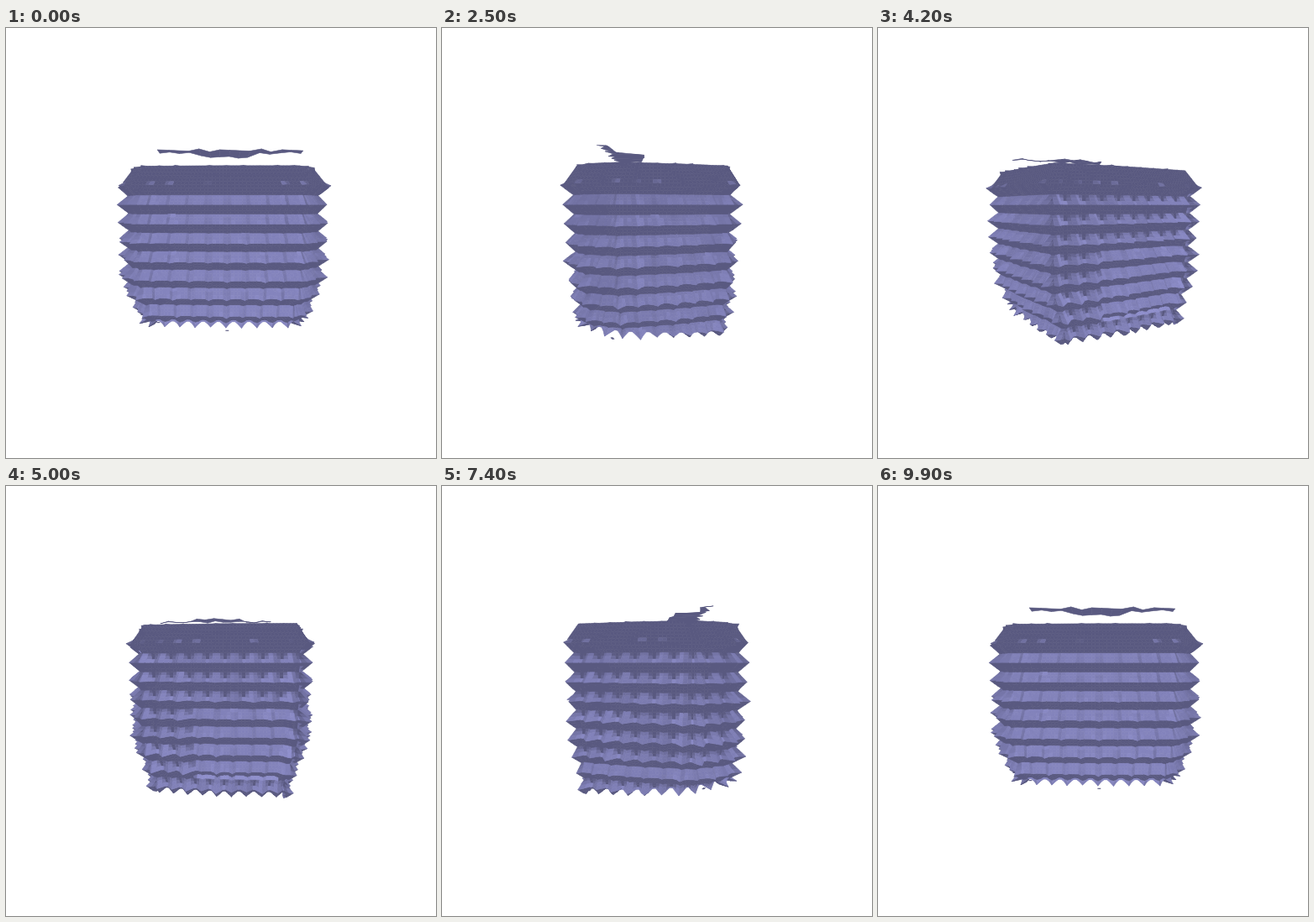
Animation, 512 px wide and 512 px high, one loop 10 s. Source, as a matplotlib script:

```python
import numpy as np
import matplotlib.pyplot as plt
from matplotlib.animation import FuncAnimation
from matplotlib.collections import PolyCollection

SIZE, FRAMES, INTERVAL = 512, 100, 100
DIST, FOCAL = 2.2, 361                 # camera distance, focal length in px
TILT = np.radians(7)                   # camera elevation
CELL, TOP = 0.108, 0.491               # lattice pitch and height of the top ridge
BUMP = 0.078                           # spike length
PER_COL, PER_ROW = 5, 6                # samples per lattice cell
AMBIENT = np.array([.35, .35, .50])
LAMP = np.array([0, 2.2, 0])

# Plan of the block as (x, z), seen from above, front edge first
PLAN = np.array([
    (-.50, .50), (0, .52), (.50, .52), (.62, .42), (.68, .20), (.60, -.15),
    (.50, -.47), (0, -.52), (-.50, -.52), (-.60, -.15), (-.66, .20), (-.59, .41),
])


def outline():
    """Sample the plan evenly; return points, outward normals, cell count."""
    loop = np.vstack([PLAN, PLAN[:1]])
    arc = np.r_[0, np.cumsum(np.hypot(*np.diff(loop, axis=0).T))]
    cells = int(round(arc[-1] / CELL))
    s = np.arange(cells * PER_COL) / (cells * PER_COL) * arc[-1]
    pts = np.stack([np.interp(s, arc, loop[:, k]) for k in (0, 1)], axis=1)
    tangent = np.roll(pts, -2, axis=0) - np.roll(pts, 2, axis=0)
    normal = np.stack([-tangent[:, 1], tangent[:, 0]], axis=1)
    normal /= np.hypot(*normal.T)[:, None]
    return pts, normal, cells


def hollow(x, z, y):
    """The sunken patch on the back."""
    return (x > -.43) & (x < .18) & (z < -.4) & (y > -.42) & (y < .05)


def ridge_strength(x, z, y, row):
    """How far the spikes of a row merge into one continuous ridge."""
    angle = np.degrees(np.arctan2(x, z))
    side = np.select([np.abs(angle) < 52, (angle > 0) & (angle < 132)], [.66, .52], .1)
    r = np.where(hollow(x, z, y), .6, side)
    r = np.where((row == 8) & (x < 0), np.maximum(r, .6), r)
    return np.where(row <= 1, .8, r)


def to_quads(p):
    nxt = np.roll(p, -1, axis=1)
    return np.stack([p[:-1], nxt[:-1], nxt[1:], p[1:]], axis=2).reshape(-1, 4, 3)


def build_walls():
    """Return the tapered wall and the straight wall used for lighting."""
    rng = np.random.default_rng(4)
    pts, normal, cells = outline()
    x, z = pts[:, 0][None], pts[:, 1][None]
    v = (np.arange(9.6 * PER_ROW) / PER_ROW)[:, None]
    u = (np.arange(cells * PER_COL) / PER_COL)[None]
    y = TOP - CELL * v
    row = np.round(v).astype(int)
    col = np.round(u).astype(int) % cells
    du, dv = np.abs(u - np.round(u)), np.abs(v - row)

    height = rng.uniform(.75, 1.2, (12, cells))[row, col]
    spike = height * np.clip(1 - (du + .9 * dv) / .58, 0, 1)
    slope = np.where(v < 1, 1, np.clip(1 - dv / .5, 0, 1))
    ridge = ridge_strength(x, z, y, row) * slope
    push = BUMP * (np.maximum(spike, ridge) - .95) - .04 * hollow(x, z, y)
    px = x + normal[:, 0] * push
    pz = z + normal[:, 1] * push
    straight = np.stack([px, y + 0 * px, pz], axis=-1)

    # Narrow top row, rounded underside, toothed bottom rim
    cap = np.interp(v, [0, 1], [.88, 1])
    t = np.clip((-.2 - y) / .22, 0, 1.2)
    px = px * cap * (1 - .13 * t)
    pz = pz * cap * (1 - .05 * t)
    rim = -.45 + .1 * pz - .07 * (.5 - du)
    tapered = np.stack([px, np.maximum(y, rim), pz], axis=-1)
    return to_quads(tapered), to_quads(straight)


def build_loose():
    """The thin sheet hovering over the block and a few crumbs below it."""
    xs = np.linspace(-.38, .49, 15)
    front = .30 + .02 * (-1.0) ** np.arange(15)
    back = np.where((xs > -.16) & (xs < .21), .10, .25) - .02 * np.sin(9 * xs)
    y = .60 + .006 * np.sin(np.arange(15) * 2.1)
    a = np.stack([xs, y, front], axis=1)
    b = np.stack([xs, y - .008, back], axis=1)
    quads = list(np.stack([a[:-1], a[1:], b[1:], b[:-1]], axis=1))
    chip = np.array([(-.01, 0, 0), (0, .004, .01), (.01, 0, 0), (0, -.004, -.01)])
    for spot in [(.04, -.535, .30), (.51, -.495, .25), (-.41, -.49, .28)]:
        quads.append(chip + spot)
    return np.array(quads)


def shade(quads):
    """Ambient plus diffuse light from a lamp above the centre."""
    n = -np.cross(quads[:, 2] - quads[:, 0], quads[:, 3] - quads[:, 1])
    n /= np.linalg.norm(n, axis=1)[:, None] + 1e-9
    ray = LAMP - quads.mean(axis=1)
    ray /= np.linalg.norm(ray, axis=1)[:, None]
    lit = np.clip(1.5 * (n * ray).sum(axis=1), 0, 1)
    return AMBIENT * (1 + .6 * lit[:, None])


walls, straight = build_walls()
loose = build_loose()
quads = np.concatenate([walls, loose])
colors = np.concatenate([shade(straight), np.tile(AMBIENT, (len(loose), 1))])
two_sided = np.arange(len(quads)) >= len(walls)

fig = plt.figure(figsize=(SIZE / 100, SIZE / 100), dpi=100, facecolor="white")
ax = fig.add_axes([0, 0, 1, 1])
ax.set(xlim=(0, SIZE), ylim=(SIZE, 0))
ax.axis("off")
mesh = PolyCollection([], edgecolors="face", linewidths=.4)
ax.add_collection(mesh, autolim=False)


def project(p, turn):
    """Screen position and depth after turning the block about its axis."""
    x, y, z = np.moveaxis(p, -1, 0)
    c, s = np.cos(turn), np.sin(turn)
    x, z = x * c - z * s, z * c + x * s
    up = y * np.cos(TILT) - z * np.sin(TILT)
    depth = DIST - z * np.cos(TILT) - y * np.sin(TILT)
    return SIZE / 2 + FOCAL * np.stack([x, -up], axis=-1) / depth[..., None], depth


def update(i):
    scr, depth = project(quads, 2 * np.pi * i / (FRAMES - 1))
    d1, d2 = scr[:, 2] - scr[:, 0], scr[:, 3] - scr[:, 1]
    facing = d1[:, 0] * d2[:, 1] - d1[:, 1] * d2[:, 0] > 0
    shown = np.flatnonzero(facing | two_sided)
    shown = shown[np.argsort(-depth[shown].mean(axis=1))]
    mesh.set_verts(scr[shown])
    mesh.set_facecolor(colors[shown])
    return [mesh]


anim = FuncAnimation(fig, update, frames=FRAMES, interval=INTERVAL,
                     repeat=True, repeat_delay=0, blit=False)
plt.show()
```
